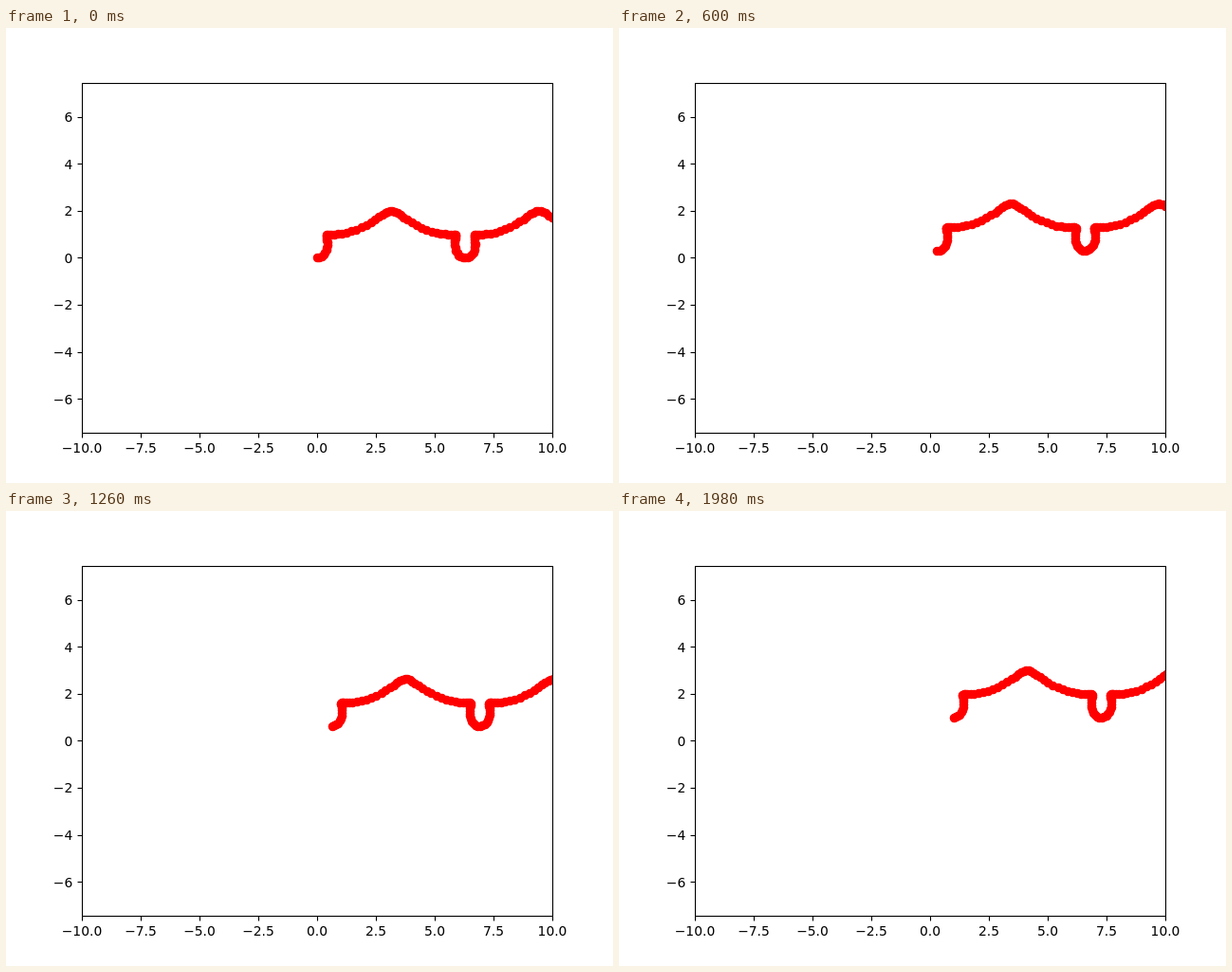
These frames come from a looping animation (640x480 px, 2000 ms). An HTML page with a canvas:

```html
<!DOCTYPE html>
<html>
<head>
<meta charset="utf-8">
<style>
html, body { margin: 0; overflow: hidden; background: #fff; }
canvas { display: block; }
</style>
</head>
<body>
<canvas id="stage" width="640" height="480"></canvas>
<script>
const ctx = document.getElementById("stage").getContext("2d");
const UNIT = 24.8, LEFT = 80, RIGHT = 576, TOP = 57.6, BOTTOM = 427.2;
const toX = x => 328 + UNIT * x;
const toY = y => 242.4 - UNIT * y;
const snap = v => Math.floor(v + 0.5) + 0.5;
const label = (v, digits) => v.toFixed(digits).replace("-", "\u2212");

function line(x1, y1, x2, y2) {
  ctx.beginPath();
  ctx.moveTo(x1, y1);
  ctx.lineTo(x2, y2);
  ctx.stroke();
}

function drawAxes() {
  ctx.strokeStyle = ctx.fillStyle = "#000";
  ctx.lineWidth = 1.11;
  ctx.font = '13.89px "DejaVu Sans", sans-serif';
  const x0 = snap(LEFT), y0 = snap(BOTTOM), y1 = snap(TOP);
  ctx.strokeRect(x0, y1, RIGHT - LEFT, y0 - y1);

  ctx.textAlign = "center";
  for (let v = -10; v <= 10; v += 2.5) {
    const x = snap(toX(v));
    line(x, y0, x, y0 + 5);
    ctx.fillText(label(v, 1), toX(v), 448);
  }
  ctx.textAlign = "right";
  for (let v = -6; v <= 6; v += 2) {
    const y = snap(toY(v));
    line(x0, y, x0 - 5, y);
    ctx.fillText(label(v, 0), 70.3, Math.round(toY(v) + 5.3));
  }
}

// Path of a point on an astroid rolling along, moved diagonally by shift
function drawCurve(shift) {
  ctx.save();
  ctx.beginPath();
  ctx.rect(LEFT, 58, RIGHT - LEFT, 369);
  ctx.clip();
  ctx.fillStyle = "#f00";
  for (let i = 0; i <= 100; i++) {
    const t = i / 10;
    const x = t - Math.sin(t) ** 3 + shift;
    const y = 1 - Math.cos(t) ** 3 + shift;
    ctx.beginPath();
    ctx.arc(snap(toX(x)), snap(toY(y)), 4.8, 0, 2 * Math.PI);
    ctx.fill();
  }
  ctx.restore();
}

const start = performance.now();
function draw() {
  const step = Math.floor((performance.now() - start) % 2000 / 20);
  ctx.fillStyle = "#fff";
  ctx.fillRect(0, 0, 640, 480);
  drawCurve(step / 100);
  drawAxes();
  requestAnimationFrame(draw);
}
draw();
</script>
</body>
</html>
```
